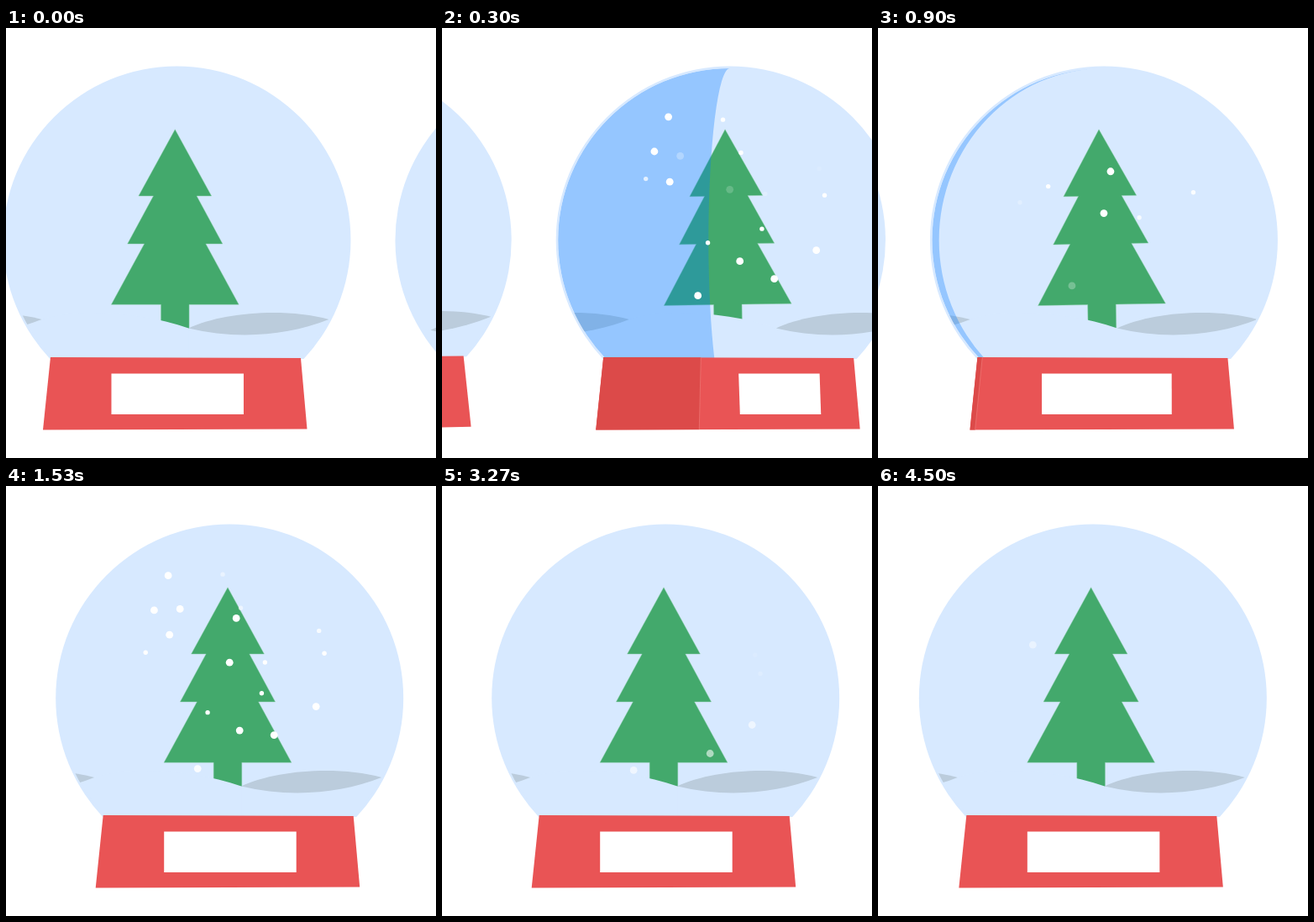
Write an HTML page with a canvas that moves like this. It is 512x512 px and loops after 4.53 s.

```html
<!DOCTYPE html>
<html lang="en">
<head>
<meta charset="utf-8">
<title>Snow globe</title>
<style>
  html, body { margin: 0; width: 100%; height: 100%; overflow: hidden; background: #fff; }
  canvas { display: block; width: 512px; height: 512px; }
</style>
</head>
<body>
<canvas id="stage" width="512" height="512"></canvas>
<script>
const ctx = document.getElementById('stage').getContext('2d');
const LOOP = 4.53, REST = 266.2, GAP = 467;
const CY = 252.5, R = 207, INNER = 204.5, TILE = 342;
const SKY = '#d7e9ff', DUNE = '#bbccdc', RED = '#e95455', DARK_RED = '#dc4a49';
const GREEN = '#43a96c', NIGHT = 'rgba(0,119,255,.31)';

const clamp = (v, lo, hi) => Math.min(hi, Math.max(lo, v));
const smooth = v => { v = clamp(v, 0, 1); return v * v * (3 - 2 * v); };

function poly(pts) {
  ctx.beginPath();
  for (const [x, y] of pts) ctx.lineTo(x, y);
  ctx.closePath();
}

function fill(color) {
  ctx.fillStyle = color;
  ctx.fill();
}

function disc(x, y, r, color) {
  ctx.beginPath();
  ctx.arc(x, y, r, 0, 7);
  fill(color);
}

// Anticipation before the wrap, exponential settling after it.
function shiftAt(t) {
  if (t < 1.5) return GAP * .8705 * Math.exp(-5.55 * t);
  const v = clamp((t - 4.05) / .48, 0, 1);
  return 34 * smooth(v / .52) - 95.5 * v ** 12.3;
}

function dunes(offset, front) {
  for (let i = -2; i <= 0; i++) {
    const x = offset + i * TILE;
    ctx.beginPath();
    ctx.moveTo(x + 14, 357.5);
    if (front) {
      ctx.bezierCurveTo(x + 70, 371, x + 130, 367, x + 181, 347);
      ctx.bezierCurveTo(x + 222, 333, x + 300, 338, x + 356, 357.5);
      ctx.lineTo(x + 356, 400);
      ctx.lineTo(x + 14, 400);
      fill(SKY);
    } else {
      ctx.bezierCurveTo(x + 55, 338, x + 130, 333, x + 181, 347);
      ctx.bezierCurveTo(x + 130, 367, x + 70, 371, x + 14, 357.5);
      fill(DUNE);
    }
  }
}

// Right-hand outline of the tree, mirrored for the left side.
const half = [[0, 120.8]];
for (const [outer, y, inner] of [[43.4, 200, 25.8], [56.6, 257, 36.6], [75.9, 329.3, 16.8]])
  half.push([outer, y], [inner, y]);
half.push([16.8, 358]);
const TREE = [...half, ...half.map(([x, y]) => [-x, y]).reverse()];

function tree(lean) {
  ctx.save();
  ctx.translate(-2.2, 345);
  ctx.rotate(lean * Math.PI / 180);
  ctx.translate(0, -345);
  poly(TREE);
  fill(GREEN);
  ctx.strokeStyle = 'rgba(140,205,170,.6)';
  ctx.lineWidth = .8;
  ctx.stroke();
  ctx.restore();
}

function night(from, to) {
  const q = Math.PI / 2;
  ctx.beginPath();
  ctx.ellipse(0, CY, Math.abs(to) * INNER, INNER, 0, -q, q, to < 0);
  ctx.ellipse(0, CY, Math.abs(from) * INNER, INNER, 0, q, -q, from > 0);
  fill(NIGHT);
}

function base(turn, from) {
  ctx.save();
  poly([[-150.5, 392], [147.5, 393], [155, 477.5], [-159.5, 478.5]]);
  fill(RED);
  ctx.clip();
  if (turn > 0) {
    const to = Math.min(1, .88 * turn - 1);
    poly([[from * 151, 390], [to * 150, 390], [to * 159, 480], [from * 160, 480]]);
    fill(DARK_RED);
    ctx.beginPath();
    ctx.moveTo(to * 150, 392);
    ctx.lineTo(to * 159, 479);
    ctx.strokeStyle = 'rgba(245,150,145,.5)';
    ctx.lineWidth = .8;
    ctx.stroke();
  }
  const left = -78 + 101 * turn, right = 79.5 + 31.3 * turn, skew = 1.9 * turn;
  if (right > left) {
    poly([[left, 411.5], [right, 411.5], [right + skew, 460], [left + skew, 460]]);
    fill('#fff');
  }
  ctx.restore();
}

function globe(x, tilt, turn, from, lean) {
  ctx.save();
  ctx.translate(x, CY);
  ctx.rotate(tilt * Math.PI / 180);
  ctx.translate(0, -CY);

  ctx.save();
  ctx.beginPath();
  ctx.rect(-220, 0, 440, 394);
  ctx.clip();
  disc(0, CY, R, SKY);
  ctx.beginPath();
  ctx.arc(0, CY, INNER, 0, 7);
  ctx.clip();
  const offset = 47 * turn;
  tree(lean);
  dunes(offset, true);
  dunes(offset, false);
  if (turn > 0) night(from, Math.min(1, turn - 1));
  ctx.restore();

  base(turn, from);
  ctx.restore();
}

let seed = 11;
function rand(lo, hi) {
  seed = seed * 16807 % 2147483647;
  return lo + (hi - lo) * seed / 2147483647;
}

const flakes = [];

// A ring of steady flakes in the upper left; the lower ones last longer.
for (let i = 0; i < 4; i++) {
  const a = 1.4 * i - 1.45, dy = 30 * Math.sin(a), lag = Math.sin(i * Math.PI / 3);
  flakes.push({
    x: 16 * Math.cos(a) - 75, y: 120 + dy, r: 4.4,
    start: -.03 - .45 * lag, period: 1.21 + .17 * lag, life: .77 + .005 * dy, until: LOOP
  });
}

// Flakes around the tree.
for (const [x, y] of [[8, 150], [0, 191], [12, 264], [53, 285], [-38, 305], [103, 251]])
  flakes.push({
    x, y, r: 4.4, start: Math.max(.01, (251 - y) / 220),
    period: .85 + .008 * clamp(x, 0, 53), life: .8, until: 2.6
  });

// Small scattered flakes.
for (let i = 0; i < 9; i++)
  flakes.push({
    x: rand(-100, 140), y: rand(85, 285), r: 2.7,
    start: rand(.05, .5), period: rand(.8, 1.5), life: .75, until: 2.6
  });

function drawFlake(t, cx, { x, y, r, start, period, life, until }) {
  for (let birth = start; birth < Math.min(t, until); birth += period) {
    const age = t - birth;
    if (age >= life) continue;
    ctx.globalAlpha = Math.min(1, age / .15, (life - age) / .15);
    disc(cx + x, y + 47 * age, r, '#fff');
  }
  ctx.globalAlpha = 1;
}

function draw(t) {
  ctx.fillStyle = '#fff';
  ctx.fillRect(0, 0, 512, 512);

  const x = REST + shiftAt(t);
  const early = t < 1.5;
  const turn = early ? Math.max(0, .9 * Math.exp(-4.5 * (t - .3)) - .02) : 0;
  const from = Math.max(-1, .9 - 19 * t);
  const lean = early ? 15.2 * Math.exp(-3 * t) * Math.sin(7.5 * (t - .32)) : 0;
  const swing = Math.min(1, t / .3);

  if (t < 1.05) globe(x - GAP, -swing, 0, -1, 0);
  globe(x, early ? swing * .8 - .8 : 0, turn, from, lean);
  for (const f of flakes) drawFlake(t, x, f);
}

const began = performance.now();
function tick() {
  draw((performance.now() - began) / 1000 % LOOP);
  requestAnimationFrame(tick);
}
tick();
</script>
</body>
</html>
```
